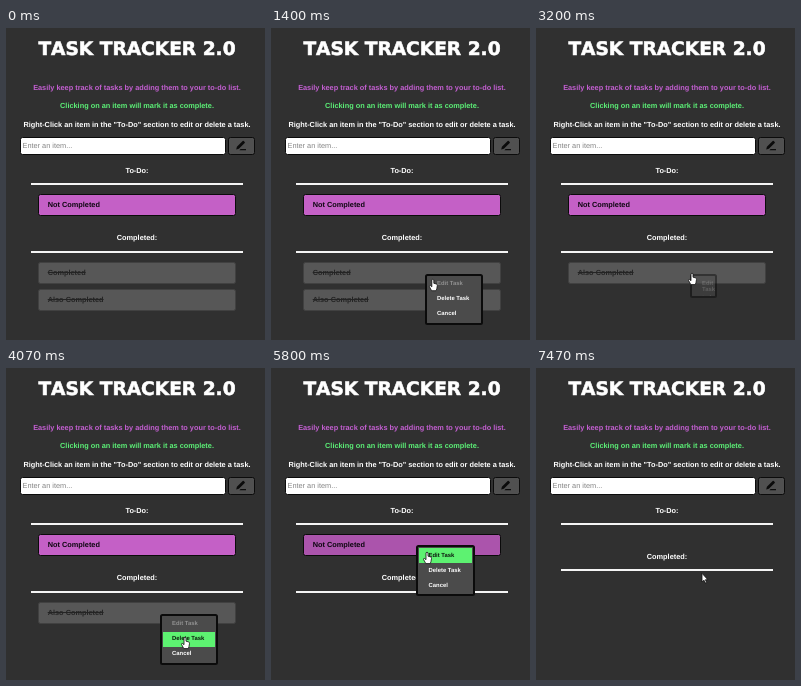
Animation, 259 px wide and 312 px high, one loop 7540 ms. Source, as an HTML page:

```html
<!DOCTYPE html>
<html lang="en">
<head>
<meta charset="utf-8">
<title>Task Tracker</title>
<style>
  html, body { margin: 0; width: 100%; height: 100%; overflow: hidden; background: #303030; }
  #stage {
    position: relative; width: 259px; height: 312px; overflow: hidden;
    font: bold 7.35px/10px "Liberation Sans", Arial, sans-serif;
    color: #fff; text-rendering: geometricPrecision;
  }
  #stage * { box-sizing: border-box; }
  #stage > * { position: absolute; }
  .line { left: 0; width: 262px; text-align: center; white-space: nowrap; }
  .title {
    top: 6px; font: bold 18.6px/31px "DejaVu Sans", sans-serif;
    font-kerning: none; -webkit-text-stroke: .6px #fff;
  }
  .rule { left: 25px; width: 212px; height: 1.5px; background: #f4f4f4; }
  .box { border: 1.5px solid #0b0b0b; border-radius: 2.5px; }
  .input {
    left: 14px; top: 109px; width: 205.5px; height: 18px; padding-left: 1.5px;
    background: #fff; color: #858585; font-weight: normal; line-height: 16px;
  }
  .button { left: 222px; top: 109px; width: 26.5px; height: 18px; background: #505050; }
  .button svg { display: block; margin: 2px auto; }
  .item {
    left: 32px; width: 197.5px; height: 22px; padding-left: 8.7px;
    background: #c460c6; color: #0d0710; line-height: 20.5px;
  }
  .done { background: #575757; border-color: #414141; color: #242424; text-decoration: line-through; }
  #menu {
    overflow: hidden; padding: 1px; border-width: 2px;
    background: #4b4b4b; font-size: 5.9px; line-height: 6px;
  }
  #menu div { height: 15px; padding: 4.5px 0 0 9.5px; }
  #menu .off { color: #929292; }
  #menu .on { background: #5df271; color: #0b160c; }
  #cursor { left: 0; top: 0; overflow: visible; }
  #cursor path { fill: #fff; stroke: #111; stroke-width: .8; stroke-linejoin: round; }
</style>
</head>
<body>
<div id="stage">
  <div class="line title">TASK TRACKER 2.0</div>
  <div class="line" style="top:54.7px;color:#c45fd2">Easily keep track of tasks by adding them to your to-do list.</div>
  <div class="line" style="top:73px;color:#5cf077">Clicking on an item will mark it as complete.</div>
  <div class="line" style="top:91.7px">Right-Click an item in the "To-Do" section to edit or delete a task.</div>
  <div class="box input">Enter an item...</div>
  <div class="box button">
    <svg width="12" height="11" viewBox="0 0 12 11"><path d="M1.2 9.6l.7-2.9L7.7 .9q.5-.4 1 0l1 1q.5.5 0 1L3.9 8.8zM5.6 9H11v1.2H4.4z" fill="#0b0b0b"/></svg>
  </div>
  <div class="line" style="top:137.6px">To-Do:</div>
  <div class="rule" style="top:155px"></div>
  <div class="box item" id="todo">Not Completed</div>
  <div class="line" id="doneLabel">Completed:</div>
  <div class="rule" id="doneRule"></div>
  <div class="box item done" id="first">Completed</div>
  <div class="box item done" id="second">Also Completed</div>
  <div class="box" id="menu"><div>Edit Task</div><div>Delete Task</div><div>Cancel</div></div>
  <svg id="cursor" width="1" height="1">
    <path id="arrow" d="M0 0V8.6L2 6.9 3.4 9.8 4.7 9.2 3.4 6.4H5.8Z"/>
    <path id="hand" d="M-1 .8Q0-.6 1 .8V4.2L3.4 4.8Q4.6 5.2 4.5 6.4L4 9.4 3.3 11.6H-1.2L-3.4 7.6Q-3.7 6.2-2.4 6.5L-1 7.7Z"/>
  </svg>
</div>
<script>
const LOOP = 7540, OPEN_TIME = 260;
const REMOVED = { first: 2330, second: 4130, todo: 6600 };

// time, x, y of the pointer tip
const PATH = [
  [40, 264, 276], [670, 156.5, 245], [1290, 156.5, 245], [1650, 180, 272],
  [2370, 180, 272], [2800, 156, 245], [3480, 156, 245], [3820, 179, 269],
  [4200, 179, 269], [4870, 149, 188], [5060, 147.5, 178.5], [5620, 147.5, 178.5],
  [5800, 156, 184], [5960, 156, 184], [6300, 166, 203], [7400, 166, 203], [7470, 166, 205.3]
];
const MENUS = [
  { from: 1070, to: REMOVED.first, x: 153.5, y: 245.5, canEdit: false },
  { from: 3130, to: REMOVED.second, x: 153.5, y: 245.5, canEdit: false },
  { from: 5270, to: REMOVED.todo, x: 145, y: 177, canEdit: true }
];
const MENU_WIDTH = 58.5, MENU_HEIGHT = 51;

const el = id => document.getElementById(id);
const show = (id, on) => { el(id).style.visibility = on ? "visible" : "hidden"; };
const clamp = v => Math.min(1, Math.max(0, v));
const within = (p, x, y, w, h) => p.x >= x && p.x <= x + w && p.y >= y && p.y <= y + h;

function pointerAt(t) {
  let i = PATH.findIndex(step => step[0] > t);
  if (i < 0) i = PATH.length;
  const a = PATH[Math.max(0, i - 1)], b = PATH[Math.min(i, PATH.length - 1)];
  const k = clamp((t - a[0]) / (b[0] - a[0] || 1)), e = k * k * (3 - 2 * k);
  return { x: a[1] + (b[1] - a[1]) * e, y: a[2] + (b[2] - a[2]) * e };
}

function drawMenu(t, pointer) {
  const menu = MENUS.find(m => t >= m.from && t < m.to);
  show("menu", menu);
  if (!menu) return false;
  const k = clamp((t - menu.from) / OPEN_TIME), grow = 1 - (1 - k) ** 2;
  const width = MENU_WIDTH * grow, height = MENU_HEIGHT * grow;
  Object.assign(el("menu").style, {
    left: menu.x + "px", top: menu.y + "px",
    width: width + "px", height: height + "px", opacity: grow
  });
  const row = Math.floor((pointer.y - menu.y - 3) / 15);
  [...el("menu").children].forEach((entry, i) => {
    const off = i === 0 && !menu.canEdit;
    entry.className = off ? "off" : i === row ? "on" : "";
  });
  return within(pointer, menu.x, menu.y, width, height);
}

function render(t) {
  const pointer = pointerAt(t);
  const shift = t < REMOVED.todo ? 0 : -21.7;
  const overMenu = drawMenu(t, pointer);
  let overItem = false;

  const placeItem = (id, top) => {
    const there = t < REMOVED[id];
    show(id, there);
    el(id).style.top = top + "px";
    overItem ||= there && within(pointer, 33, top, 196, 21);
  };
  placeItem("todo", 166);
  placeItem("first", 233.7);
  placeItem("second", t < REMOVED.first ? 260.7 : 233.7);

  el("todo").style.filter = `brightness(${1 - 0.13 * clamp((t - 4940) / 150)})`;
  el("doneLabel").style.top = 205.3 + shift + "px";
  el("doneRule").style.top = 223 + shift + "px";

  const hand = overMenu || overItem;
  show("hand", hand);
  show("arrow", !hand);
  el("cursor").style.transform = `translate(${pointer.x}px, ${pointer.y}px)`;
}

const start = performance.now();
function tick() {
  render((performance.now() - start) % LOOP);
  requestAnimationFrame(tick);
}
tick();
</script>
</body>
</html>
```
